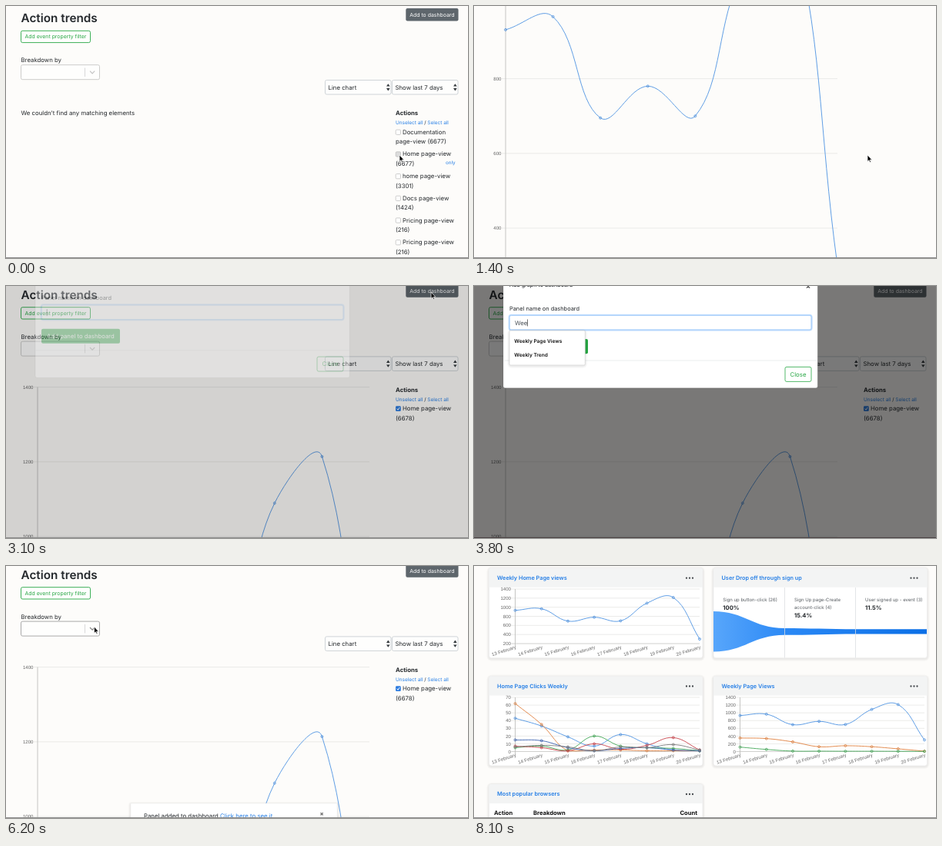
Recreate the animation shown at these times as an HTML page. Size 600x328 px, loop 8200 ms.

```html
<!DOCTYPE html>
<html lang="en">
<head>
<meta charset="utf-8">
<title>Action trends</title>
<style>
  html, body { margin: 0; width: 100%; height: 100%; overflow: hidden; background: #fdfcfa; }
  svg { display: block; width: 100%; height: 100%; }
  text { font-family: Inter, "Open Sans", sans-serif; white-space: pre; text-rendering: geometricPrecision; }
  .axis { font-family: "Liberation Sans", Arial, sans-serif; }
  .icon { font-family: "DejaVu Sans", sans-serif; }
</style>
</head>
<body>
<svg id="stage" viewBox="0 0 600 328" preserveAspectRatio="none"></svg>
<script>
const LOOP = 8200, TICK = 100;
const INK = '#24282c', BLUE = '#267fe6', LINE = '#4f94e2', GREEN = '#28a745', BG = '#fdfcfa';
const stage = document.getElementById('stage');
const pen = document.createElement('canvas').getContext('2d');

const clamp = (v, a = 0, b = 1) => Math.min(b, Math.max(a, v));
const span = (t, start, length) => clamp((t - start) / length);
const outQuart = p => 1 - (1 - p) ** 4;
const r2 = v => Math.round(v * 100) / 100;

// Linear lookup in rows of [time, value, value...]
function track(t, rows) {
  if (t <= rows[0][0]) return rows[0].slice(1);
  for (let i = 1; i < rows.length; i++) {
    const a = rows[i - 1], b = rows[i];
    if (t <= b[0]) {
      const p = (t - a[0]) / (b[0] - a[0]);
      return a.slice(1).map((v, k) => v + (b[k + 1] - v) * p);
    }
  }
  return rows[rows.length - 1].slice(1);
}

const SCROLL = [[700, 0], [800, .6], [900, 6], [1000, 40], [1300, 300], [1600, 400], [1800, 420],
  [2100, 420], [2200, 230], [2300, 65], [2500, 14], [2700, 6], [2900, 4.6]];
const POINTER = [[0, 511, 194], [2400, 511, 194], [2900, 552, 8], [3200, 552, 8], [3400, 200, 50],
  [5200, 200, 50], [5300, 171, 76], [5600, 114.5, 79], [6200, 114.5, 79], [6600, 300, 298],
  [7100, 300, 300], [7500, 308, 336]];

// Drawing helpers; text is placed by its vertical centre
function text(x, cy, s, size = 7.8, o = {}) {
  return `<text x="${x}" y="${r2(cy + size * .35)}" font-size="${size}" fill="${o.fill || INK}"` +
    ` font-weight="${o.weight || 400}" text-anchor="${o.anchor || 'start'}"` +
    ` class="${o.cls || ''}" ${o.more || ''}>${s}</text>`;
}
function box(x, y, w, h, fill, stroke = 'none', r = 2, more = '') {
  return `<rect x="${x}" y="${y}" width="${w}" height="${h}" rx="${r}" fill="${fill}" stroke="${stroke}" ${more}/>`;
}
function path(d, stroke, width = 1, fill = 'none') {
  return `<path d="${d}" stroke="${stroke}" stroke-width="${width}" fill="${fill}"/>`;
}
const group = (body, attrs) => `<g ${attrs}>${body}</g>`;
const shift = (body, x, y) => group(body, `transform="translate(${r2(x)} ${r2(y)})"`);
const shadow = (x, y, w, h, r = 3) =>
  [3, 2, 1].map(k => box(x - k, y - k + 1, w + 2 * k, h + 2 * k, '#000', 'none', r + k, 'opacity=".025"')).join('');

// Smooth curve whose handles depend on the distances to both neighbours
function curve(pts, top, bottom) {
  const handles = pts.map((c, i) => {
    const a = pts[i - 1] || c, b = pts[i + 1] || c;
    const d0 = Math.hypot(c[0] - a[0], c[1] - a[1]), d1 = Math.hypot(b[0] - c[0], b[1] - c[1]);
    const f0 = .4 * d0 / (d0 + d1), f1 = .4 * d1 / (d0 + d1);
    const dx = b[0] - a[0], dy = b[1] - a[1];
    return [[c[0] - f0 * dx, clamp(c[1] - f0 * dy, top, bottom)],
            [c[0] + f1 * dx, clamp(c[1] + f1 * dy, top, bottom)]];
  });
  return pts.map((c, i) => i
    ? 'C' + [...handles[i - 1][1], ...handles[i][0], ...c].map(r2)
    : 'M' + c.map(r2)).join('');
}

const DAYS = [13, 14, 15, 16, 17, 18, 19, 20].map(d => d + ' February');

function chart(c, grow) {
  const { x0, x1, top, bottom, min, max, step } = c;
  const yOf = v => bottom - (v - min) / (max - min) * (bottom - top);
  const xOf = i => x0 + (x1 - x0) * i / 7;
  let out = '';
  for (let v = min; v <= max; v += step) {
    const y = r2(yOf(v));
    out += path(`M${x0 - 5} ${y}H${x1}`, v === min ? '#c4c4c2' : '#e6e6e4', .8);
    out += text(x0 - 5.5, y, v, 6.1, { fill: '#666', anchor: 'end', cls: 'axis' });
  }
  out += path(`M${x0} ${top}V${bottom + 4}`, '#c0c0be', .9);
  DAYS.forEach((d, i) => {
    const x = r2(xOf(i)), y = bottom + (c.tilt ? 4.5 : 9);
    out += text(x + (c.tilt ? 1 : 0), y, d, 6.1, {
      fill: '#666', cls: 'axis', anchor: c.tilt ? 'end' : 'middle',
      more: c.tilt ? `transform="rotate(-18 ${x} ${y})"` : ''
    });
  });
  for (const [color, values] of c.series) {
    const pts = values.map((v, i) => [xOf(i), bottom + (yOf(v) - bottom) * grow]);
    out += path(curve(pts, top, bottom), color, .9);
    out += pts.map(p => `<circle cx="${r2(p[0])}" cy="${r2(p[1])}" r="1.5" fill="#8888881a" stroke="${color}" stroke-width=".8"/>`).join('');
  }
  return out;
}

const HOME = [931, 966, 695, 780, 700, 1089.5, 1214, 300];
const BIG = { x0: 41, x1: 472, top: 136.2, bottom: 719.7, min: 200, max: 1400, step: 200, series: [[LINE, HOME]] };
const WEEKLY = { x0: 53.5, x1: 293, top: 30, bottom: 101, min: 200, max: 1400, step: 200, tilt: true, series: [[LINE, HOME]] };
const CLICKS = { x0: 53.5, x1: 293, top: 171, bottom: 241.5, min: 0, max: 70, step: 10, tilt: true, series: [
  [LINE, [43, 33, 19, 7, 22, 10, 2, 1]],
  ['#e0803f', [62, 35, 1, 2, 2, 1, 1, 1]],
  ['#43a857', [5, 7, 2, 20, 7, 5, 4, 1]],
  ['#c8434b', [7, 5, 1, 10, 3, 8, 18, 2]],
  ['#3b62b0', [15, 14, 5, 1, 4, 5, 2, 1]],
  ['#7d7d7d', [6, 8, 6, 1, 6, 5, 9, 2]]
] };
const VIEWS = { x0: 345.5, x1: 585, top: 171, bottom: 241.5, min: 0, max: 1400, step: 200, tilt: true, series: [
  [LINE, HOME],
  ['#e0803f', [350, 335, 250, 125, 150, 125, 70, 10]],
  ['#43a857', [115, 55, 12, 10, 8, 8, 6, 4]]
] };

function picker(x, w, label) {
  return box(x + .5, 96.5, w - 1, 18.5, '#fefefd', '#cfd4d8') + text(x + 4.5, 105.8, label) +
    path(`M${x + w - 6.5} 104.6h4.6l-2.3-3.4zM${x + w - 6.5} 107h4.6l-2.3 3.4z`, 'none', 0, '#33383c');
}

function check(y, state) {
  if (state === 'on')
    return box(506, y - 3.3, 6.8, 6.8, '#2f7de0', 'none', 1.4) +
      path(`M507.6 ${y}l1.4 1.7l2.3-3.4`, '#fff', 1);
  return box(506.2, y - 3.1, 6.3, 6.3, state === 'hover' ? '#dcdcdc' : '#fff', '#b9b9b9', 1.2, 'stroke-width=".7"');
}

const ITEMS = [['Documentation', 'page-view (6677)'], ['Home page-view', '(6677)'], ['home page-view', '(3301)'],
  ['Docs page-view', '(1424)'], ['Pricing page-view', '(216)'], ['Pricing page-view', '(216)']];

function item([a, b], y, state) {
  return check(y, state) + text(515, y - .2, a) + text(506, y + 12.2, b);
}

function trends(t, pointer) {
  const overSelect = t >= 6000 && pointer[0] < 122 && pointer[1] < 92;
  let out = text(19.5, 16, 'Action trends', 15.3, { weight: 600 });
  out += box(519.3, 3, 68.2, 16.4, '#5e666c') + text(553.4, 11.2, 'Add to dashboard', 6.9, { fill: '#fff', anchor: 'middle' });
  out += box(19.5, 32.3, 90, 15.3, '#fefefd', GREEN, 2, 'stroke-width=".9"') +
    text(64.5, 40, 'Add event property filter', 6.9, { fill: GREEN, anchor: 'middle' });
  out += text(19.5, 70.5, 'Breakdown by');
  out += box(19.5, 76.7, 102, 19, '#fefefd', overSelect ? '#a9a9a9' : '#cccccb') +
    path('M102.5 80.5V92', '#cfcfce', .8) +
    path('M109 84.6l3.1 3.2l3.1-3.2', overSelect ? '#8a8a8a' : '#c4c4c4', 1.2);
  out += picker(414, 86.5, 'Line chart') + picker(501, 86.5, 'Show last 7 days');
  out += text(506, 139.5, 'Actions', 7.8, { weight: 700 });
  out += text(506, 152.2, `Unselect all<tspan fill="${INK}"> / </tspan>Select all`, 6.45, { fill: BLUE });
  if (t < 200) {
    out += text(19.5, 139.3, "We couldn't find any matching elements");
    ITEMS.forEach((it, i) => {
      out += item(it, 164.2 + i * 28.7, i === 1 ? (t < 100 ? 'hover' : 'on') : 'off');
    });
    out += text(571, 203.5, 'only', 6.3, { fill: BLUE });
  } else {
    out += chart(BIG, outQuart(span(t, 100, 600)));
    out += item(['Home page-view', '(6678)'], 164.2, 'on');
  }
  return shift(out, 0, -track(t, SCROLL)[0]);
}

function modal(t) {
  const fade = Math.min(span(t, 3000, 300), 1 - span(t, 5700, 300));
  if (fade <= 0) return '';
  const full = 'Weekly Home Page views';
  const count = t < 3800 ? Math.floor(clamp((t - 3400) / 130, 0, 3))
    : Math.min(full.length, 3 + Math.floor((t - 3800) / 67));
  const typed = full.slice(0, count);
  pen.font = '100px Inter, "Open Sans", sans-serif';
  const caret = r2(53.2 + pen.measureText(typed).width * .0775);
  let out = box(38, -30, 408.3, 162.8, '#fff', '#00000033', 2.5, 'stroke-width=".6"');
  out += text(46, -1.6, 'Add graph to dashboard', 7.1, { weight: 500 });
  out += path('M431.9 -1.8l4.2 4.4m0 -4.4l-4.2 4.4', '#444', 1.1);
  out += text(46, 29, 'Panel name on dashboard', 7.4);
  out += box(45.5, 37.6, 393.2, 20, '#fff', '#bfdcfd', 3, 'stroke-width="1.8"') +
    box(46.3, 38.4, 391.6, 18.4, '#fff', '#8fc1fa', 2, 'stroke-width=".7"');
  out += text(53, 47.9, typed, 7.75, { fill: '#495057' });
  if (t < 5400 || t % 1000 < 500) out += path(`M${caret} 43.4V52.4`, '#333', .7);
  out += box(46, 69, 102, 19.2, t >= 5500 ? '#218838' : GREEN) +
    text(97, 78.8, 'Add panel to dashboard', 7.75, { fill: '#fff', anchor: 'middle' });
  out += path('M38.3 97H445.9', '#e3e5e7', .7);
  out += box(404, 105.4, 34, 19, '#fff', GREEN, 2, 'stroke-width=".8"') +
    text(421, 115.1, 'Close', 7.8, { fill: GREEN, anchor: 'middle' });
  if (count > 0 && count < 8) {
    out += shadow(46, 58, 98.3, 45) + box(46, 58, 98.3, 45, '#fff', '#c9c9c9', 1.5, 'stroke-width=".6"');
    out += text(52.3, 71.6, 'Weekly Page Views', 6.55, { weight: 600, fill: '#111' });
    out += text(52.3, 90.1, 'Weekly Trend', 6.55, { weight: 600, fill: '#111' });
  }
  return box(0, 0, 600, 328, '#000', 'none', 0, `opacity="${r2(fade * .52)}"`) +
    group(shift(out, 0, (fade - 1) * 20), `opacity="${r2(fade)}"`);
}

function toast(t) {
  if (t < 6100 || t >= 6800) return '';
  const [y] = track(t, [[6100, 328], [6200, 309], [6300, 281], [6400, 287], [6500, 285]]);
  return shift(shadow(162, 0, 268, 33, 1) + box(162, 0, 268, 33, '#fff', '#eeeeee', 1, 'stroke-width=".5"') +
    text(179, 16.6, `Panel added to dashboard <tspan fill="${BLUE}">Click here to see it</tspan>`) +
    text(410, 14, '✖', 6.2, { fill: '#777', anchor: 'middle', cls: 'icon' }), 0, y);
}

function card(x, y, h, title) {
  const w = 277.5;
  return shadow(x, y, w, h) + box(x, y, w, h, '#fff', '#e8e8e7', 3, 'stroke-width=".6"') +
    path(`M${x} ${y + 25}V${y + 3}q0-3 3-3H${x + w - 3}q3 0 3 3V${y + 25}z`, 'none', 0, '#f3f4f4') +
    text(x + 10.5, y + 12.7, title, 7.3, { weight: 600, fill: BLUE }) +
    [256.5, 260.5, 264.5].map(d => `<circle cx="${x + d}" cy="${y + 13}" r="1.15" fill="#45494d"/>`).join('');
}

function funnel() {
  const step = (x, lines, rate) =>
    lines.map((s, i) => text(x, 43.7 + i * 9.8, s, 6, { fill: '#555a5f' })).join('') +
    text(x, 44 + lines.length * 10, rate, 7.6, { weight: 700 });
  return '<defs><linearGradient id="flow"><stop offset="0" stop-color="#58a6fb"/>' +
    '<stop offset=".35" stop-color="#2a88f5"/><stop offset="1" stop-color="#0b6fe6"/></linearGradient></defs>' +
    path('M311 59C352 59 362 81 403.5 81C435 81 460 82.2 495.5 82.2H588V88.4H495.5' +
      'C460 88.4 435 89.8 403.5 89.8C362 89.8 352 111.5 311 111.5z', 'none', 0, 'url(#flow)') +
    path('M403.5 28V119.5M495.5 28V119.5', '#dcdfe2', .8) +
    step(323.3, ['Sign up button-click (26)'], '100%') +
    step(416, ['Sign Up page-Create', 'account-click (4)'], '15.4%') +
    step(508, ['User signed up - event (3)'], '11.5%');
}

function dashboard(t) {
  const grow = (start, length) => outQuart(span(t, start, length));
  const bold = { weight: 700, fill: '#111' };
  let out = card(19.5, 2.7, 117, 'Weekly Home Page views') + card(311, 2.7, 117, 'User Drop off through sign up') +
    card(19.5, 143.5, 116.5, 'Home Page Clicks Weekly') + card(311, 143.5, 116.5, 'Weekly Page Views') +
    card(19.5, 284, 80, 'Most popular browsers');
  if (t >= 6900) {
    out += funnel() + chart(WEEKLY, grow(6900, 700));
    out += text(26, 321, 'Action', 7.6, bold) + text(77, 321, 'Breakdown', 7.6, bold) +
      text(290, 321, 'Count', 7.6, { ...bold, anchor: 'end' });
  }
  if (t >= 7000) out += chart(CLICKS, grow(7000, 800)) + chart(VIEWS, grow(7000, 800));
  return out;
}

function cursor([x, y]) {
  return shift(path('M0 0V8.4L1.9 6.7L3.2 9.6L4.5 9L3.2 6.2H5.8z', '#fff', .7, '#000'), x, y);
}

function scene(t) {
  const pointer = track(t, POINTER);
  const page = t < 6800 ? trends(t, pointer) : dashboard(t);
  const dim = t >= 3200 && t < 5900;
  return box(0, 0, 600, 328, BG, 'none', 0) + page + modal(t) + toast(t) +
    path('M0 327.5H600', dim ? '#4b4243' : '#8f8f8e', 1) +
    (t < 3500 || t >= 5300 ? cursor(pointer) : '');
}

const begin = performance.now();
let last = -1;
function play() {
  const t = Math.floor(((performance.now() - begin) % LOOP) / TICK) * TICK;
  if (t !== last) {
    stage.innerHTML = scene(t);
    last = t;
  }
  requestAnimationFrame(play);
}
play();
</script>
</body>
</html>
```
